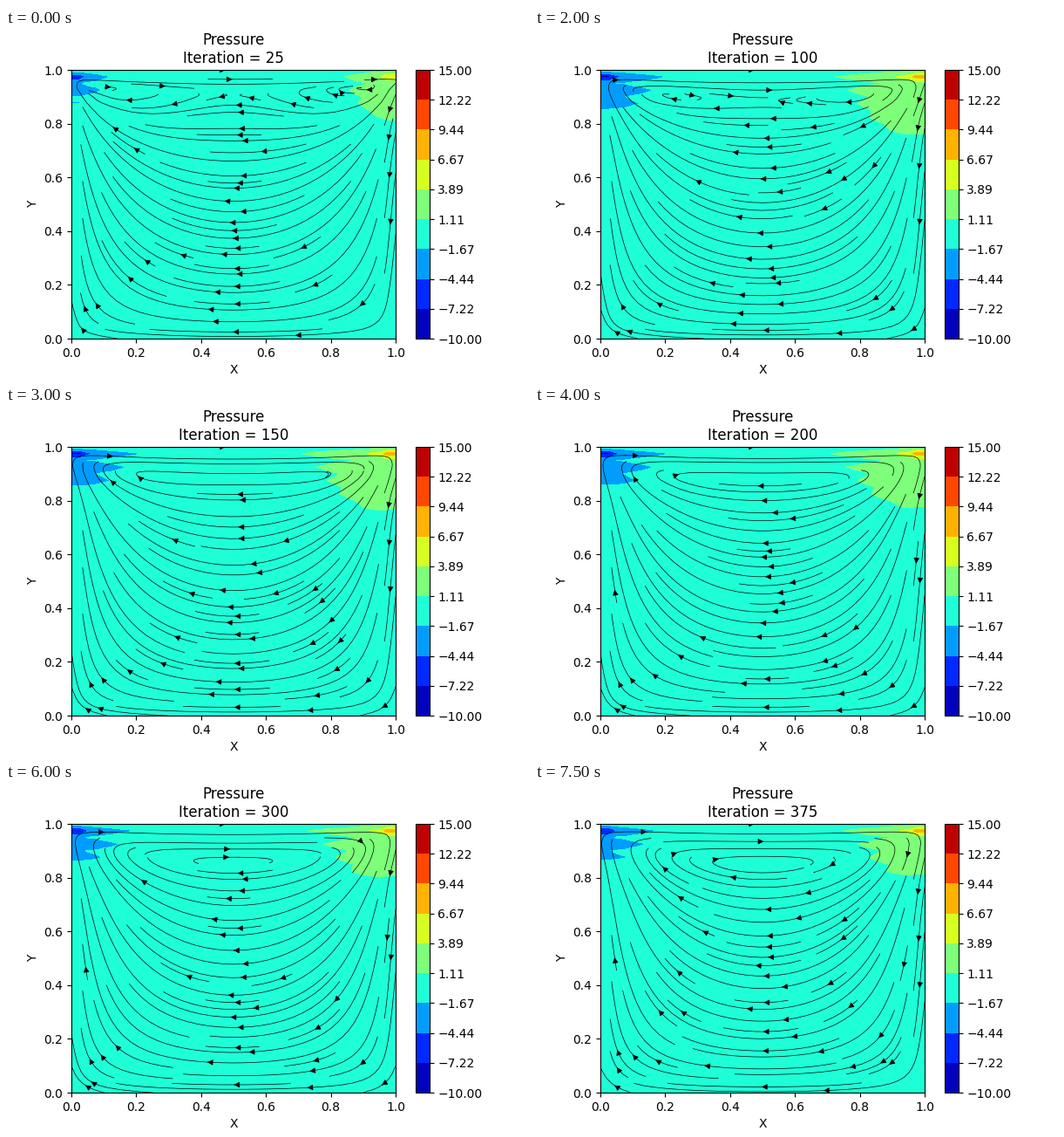
A matplotlib script for the animation above (8000 ms loop, 600 px wide and 400 px high).

```python
import numpy as np
import matplotlib.pyplot as plt
from matplotlib.animation import FuncAnimation

N, NU, DT, SWEEPS = 41, 0.1, 1e-4, 50
FRAMES, STEPS = 16, 25
H = 1 / (N - 1)
axis_pts = np.linspace(0, 1, N)
X, Y = np.meshgrid(axis_pts, axis_pts)
LEVELS = np.linspace(-10, 15, 10)

C = np.s_[1:-1, 1:-1]
E, W = np.s_[1:-1, 2:], np.s_[1:-1, :-2]
T, B = np.s_[2:, 1:-1], np.s_[:-2, 1:-1]


def ddx(f):
    return (f[E] - f[W]) / (2 * H)


def ddy(f):
    return (f[T] - f[B]) / (2 * H)


def advance(f, u, v):
    """Upwind convection plus central diffusion of f."""
    conv = u[C] * (f[C] - f[W]) / H + v[C] * (f[C] - f[B]) / H
    diff = NU * (f[E] + f[W] + f[T] + f[B] - 4 * f[C]) / H**2
    return f[C] + DT * (diff - conv)


def solve_pressure(p, u, v):
    """Jacobi sweeps: zero gradient at the walls, zero pressure at the lid."""
    ux, uy, vx, vy = ddx(u), ddy(u), ddx(v), ddy(v)
    rhs = (ux + vy) / DT - ux**2 - 2 * uy * vx - vy**2
    for _ in range(SWEEPS):
        p[C] = (p[E] + p[W] + p[T] + p[B] - H**2 * rhs) / 4
        p[:, -1], p[0], p[:, 0] = p[:, -2], p[1], p[:, 1]
        p[-1] = 0


def simulate():
    u, v, p = np.zeros((3, N, N))
    u[-1] = 1
    states = {}
    for n in range(1, STEPS * (FRAMES - 1) + 1):
        solve_pressure(p, u, v)
        new_u = advance(u, u, v) - DT * ddx(p)
        new_v = advance(v, u, v) - DT * ddy(p)
        u[C], v[C] = new_u, new_v
        if n % STEPS == 0:
            states[n] = u.copy(), v.copy(), p.copy()
    return states


states = simulate()
fig, ax = plt.subplots(figsize=(6, 4), dpi=100)
first = ax.contourf(X, Y, states[STEPS][2], LEVELS, cmap="jet")
fig.colorbar(first, ax=ax)


def draw(frame):
    n = STEPS * max(frame, 1)
    u, v, p = states[n]
    ax.clear()
    ax.contourf(X, Y, p, LEVELS, cmap="jet")
    ax.streamplot(X, Y, u, v, color="black", linewidth=0.5)
    ax.set(xlim=(0, 1), ylim=(0, 1), xlabel="X", ylabel="Y",
           title=f"Pressure\nIteration = {n}")


anim = FuncAnimation(fig, draw, frames=FRAMES, interval=500,
                     repeat=True, repeat_delay=0)
plt.show()
```
